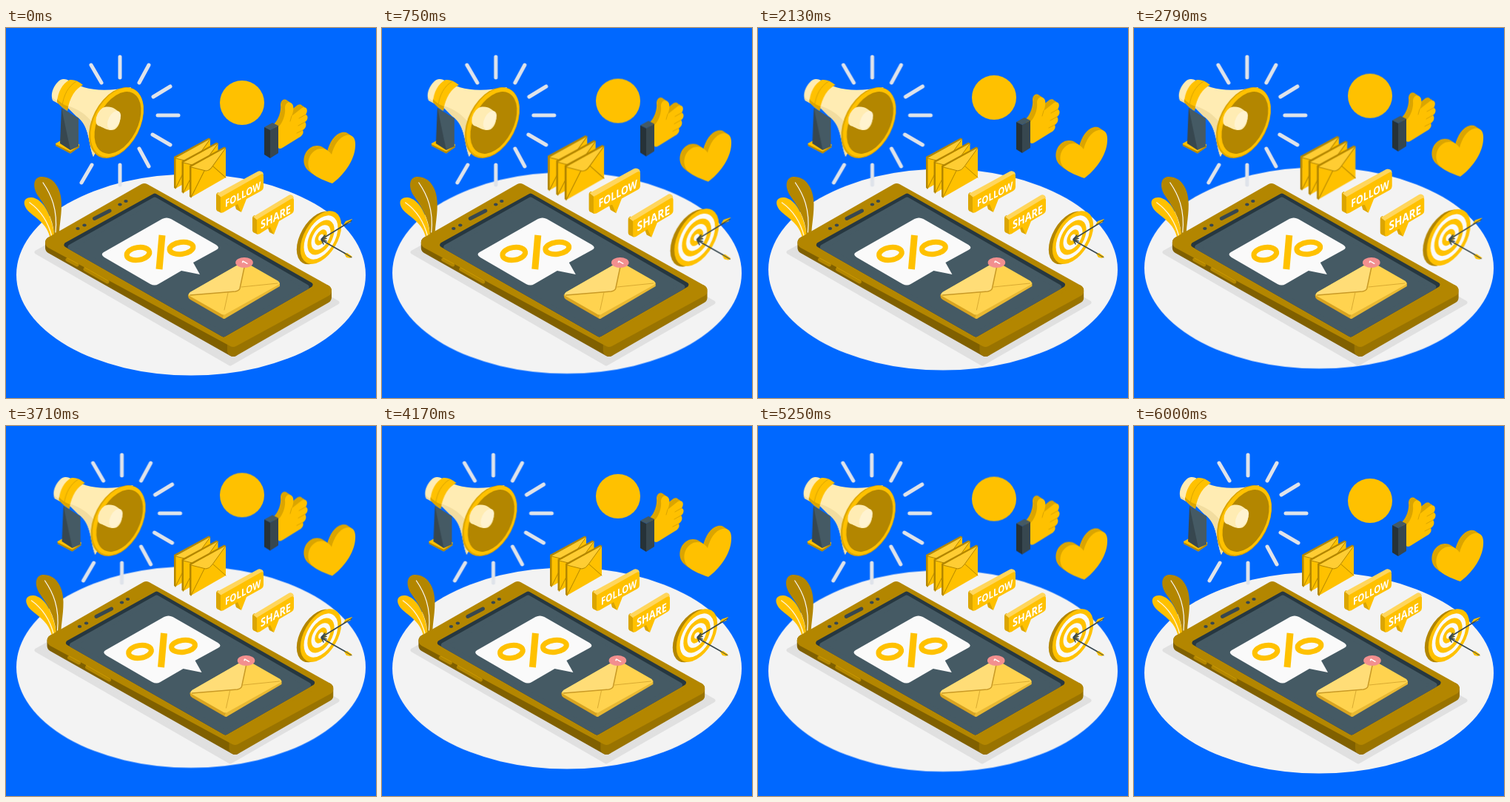
An HTML page for the animation above (6040 ms loop, 500 px wide and 500 px high).

```html
<!DOCTYPE html>
<html lang="en">
<head>
<meta charset="utf-8">
<title>Mobile marketing</title>
<style>
  html, body { margin: 0; width: 100%; height: 100%; overflow: hidden; background: #0068ff; }
  svg { display: block; width: 100vw; height: 100vh; }
  text { font-family: "Open Sans", "Noto Sans", sans-serif; font-weight: 700; fill: #fff; }

  .gold { fill: #ffc100; }
  .deep { fill: #dba500; }
  .dark { fill: #b38600; }
  .cream { fill: #ffecb3; }
  .slate { fill: #455a64; }
  .night { fill: #37474f; }
  .white { fill: #fafafa; }
  .line { fill: none; stroke-linecap: round; stroke-linejoin: round; }
  .round { stroke-linejoin: round; }

  /* A six second cycle, then a short rest on the first pose. */
  .float, .shake, .beat { animation: float 6.04s linear infinite; }
  .shake { animation-name: shake; }
  .beat { animation-name: beat; }
  .mails { transform-origin: 262.5px 189px; }
  .bubbles { transform-origin: 337px 236px; }
  .goal { transform-origin: 430.5px 283px; }

  @keyframes float {
    0%, 99.34%, 100% { transform: translateY(0); }
    49.67% { transform: translateY(-10px); }
  }
  @keyframes shake {
    0%, 99.34%, 100% { transform: translateX(0); }
    9.93%, 89.4% { transform: translateX(-1px); }
    19.87%, 79.47% { transform: translateX(2px); }
    29.8%, 49.67%, 69.54% { transform: translateX(-4px); }
    39.74%, 59.6% { transform: translateX(4px); }
  }
  @keyframes beat {
    0%, 29.8%, 39.74%, 59.6%, 100% { transform: scale(1); }
    9.93%, 49.67% { transform: scale(1.1); }
  }
</style>
</head>
<body>
<svg viewBox="0 0 500 500">
  <defs>
    <g id="mail">
      <path class="dark" d="M248 186L295 160.500L297 162L250 188V229L248 228Z"/>
      <path class="gold" d="M250 188L297 162V202L250 229Z"/>
      <path fill="#ffcd33" d="M250 188L297 162L279 187Q275 193 270 193Z"/>
      <path class="line" stroke="#b38600" stroke-width="1" d="M250 188L270 193Q275 193 279 187L297 162M250 229L268 193M297 202L280 187M250 188V229"/>
    </g>
    <path id="hand" d="M368 134C374 128 378 117 377 108C377 99 386 98 388 105C389 110 388 114 386 119L400 108C406 105 409 111 405 117C409 118 408 125 404 127C407 130 405 136 401 138C403 142 400 146 396 148L375 161C371 164 368 163 367 161Z"/>
    <path id="heart" d="M441 210C430 206 412 200 409 188C406 174 416 163 426 163C434 163 438 168 440 171C443 159 450 147 460 145C469 143 473 150 472 160C471 180 455 200 441 210Z"/>
  </defs>

  <rect width="500" height="500" fill="#0068ff"/>
  <ellipse class="float" cx="250" cy="333.500" rx="236" ry="136" fill="#f3f3f3"/>
  <path class="round" d="M41 303L187 222L448 371L303 454Z" fill="#e0e0e0" stroke="#e0e0e0" stroke-width="5"/>

  <g class="float">
    <circle class="gold" cx="319" cy="101" r="30"/>

    <g>
      <use href="#hand" class="deep" x="-6" y="-4"/>
      <use href="#hand" class="deep" x="-3" y="-2"/>
      <use href="#hand" class="gold"/>
      <path class="line" stroke="#dba500" d="M386 119L384 126M405 117L396 122M404 127L395 132M401 138L393 142"/>
      <path class="slate" d="M349 134L360 128L368 132L357 138Z"/>
      <path fill="#263238" d="M349 134L357 138V176L349 171Z"/>
      <path class="night" d="M357 138L368 132V169L357 176Z"/>
    </g>

    <g>
      <use href="#heart" class="deep" x="-6" y="-4"/>
      <use href="#heart" class="deep" x="-3" y="-2"/>
      <use href="#heart" class="gold"/>
    </g>
  </g>

  <g class="beat mails">
    <use href="#mail" x="-21" y="-12"/>
    <use href="#mail" x="-10.500" y="-6"/>
    <use href="#mail"/>
  </g>

  <g class="beat bubbles">
    <g>
      <path class="deep" d="M284 226Q284 223 287 222L291 229V250L287 248Q284 247 284 244Z"/>
      <path fill="#ffd65c" d="M285 224L340 194Q343 192 347 195L348 198L291 229Z"/>
      <path class="deep" d="M309 238L314 238L318 249L311 245Z"/>
      <path class="gold" d="M290 230Q290 228 293 227L344 198Q348 196 348 200V215Q348 218 345 220L325 231L318 249L313 238L294 249Q290 251 290 247Z"/>
      <text transform="matrix(.82 -.43 0 1 296 242.500)" font-size="14">FOLLOW</text>
    </g>
    <g>
      <path class="deep" d="M333 257Q333 254 336 253L340 260V279L336 277Q333 276 333 273Z"/>
      <path fill="#ffd65c" d="M334 255L382 226Q385 224 388 227L389 230L340 260Z"/>
      <path class="deep" d="M353 268L358 268L362 279L356 276Z"/>
      <path class="gold" d="M339 260Q339 258 342 257L385 231Q389 229 389 232V246Q389 249 386 251L369 261L362 279L357 269L343 278Q339 280 339 276Z"/>
      <text transform="matrix(.82 -.45 0 1 344 272)" font-size="15.500">SHARE</text>
    </g>
  </g>

  <g class="beat goal">
    <g transform="matrix(.866 -.5 0 1 420.500 283.500)"><circle class="dark" r="32"/></g>
    <g transform="matrix(.866 -.5 0 1 425.500 283)">
      <circle class="gold" r="32"/>
      <circle class="white" r="26.500"/>
      <circle class="gold" r="21"/>
      <circle class="white" r="15"/>
      <circle class="gold" r="9.500"/>
      <circle class="white" r="4"/>
    </g>
    <g class="line" stroke="#37474f" stroke-width="1.500">
      <path d="M427 285L466 261M427 287L466 309"/>
      <path d="M431 280L426 285.500L433 284.500M433 288L426 286L429 292"/>
    </g>
    <path class="gold" d="M456 266L459 261L468 258L465 263ZM457 305L461 304L468 309L465 311L460 310Z"/>
    <path class="line" stroke="#37474f" d="M457 266L467 260M457 304L467 310"/>
  </g>

  <g class="shake">
    <!-- leaves -->
    <path class="gold" d="M60 286C56 262 37 256 28 245C21 235 26 228 35 229C50 231 62 252 66 284Z"/>
    <path class="line" stroke="#fff3cc" stroke-width="1.500" d="M32 236C46 246 57 262 62 282"/>
    <path class="dark" d="M65 286C66 264 57 246 44 228C35 215 37 202 47 201C63 200 75 215 75 238C75 258 71 270 72 286Z"/>
    <path class="line" stroke="#fafafa" stroke-width="1.200" d="M50 209C61 225 70 245 67 276"/>

    <!-- phone body -->
    <g class="round" stroke-width="16">
      <path d="M61 290L307 423V436L61 297Z" fill="#806000" stroke="#806000"/>
      <path d="M307 423L432 355V364L307 436Z" fill="#997300" stroke="#997300"/>
      <path class="dark" d="M61 290L187 218L432 355L307 423Z" stroke="#b38600"/>
    </g>
    <g class="line" stroke="#b38600" stroke-width="5">
      <path d="M83 313L96 320M107 326L137 343"/>
    </g>
    <path class="line" stroke="#cc9a00" d="M83 311L97 318.500M106 323.500L138 341.500"/>
    <path class="line" stroke="#37474f" stroke-width="5" d="M119.500 257.500L140 247"/>
    <g class="night">
      <ellipse cx="97" cy="271" rx="2.700" ry="2"/>
      <ellipse cx="106" cy="266.500" rx="2.700" ry="2"/>
      <ellipse cx="154" cy="238.500" rx="2.700" ry="2"/>
      <ellipse cx="162" cy="234" rx="2.700" ry="2"/>
    </g>
    <g class="round" stroke-width="7">
      <path d="M82 293L201 227L411 347L294 414Z" fill="#263740" stroke="#263740"/>
      <path class="slate" d="M87 296L201 232L406 350L294 414Z" stroke="#455a64"/>
    </g>

    <!-- discount bubble -->
    <path class="white" d="M132 303L211 258Q217 255 223 258L284 293Q290 297 284 300L253 317L262 333L237 328L206 346Q201 349 195 346L133 310Q127 306 132 303Z"/>
    <g class="line" stroke="#ffc100">
      <ellipse cx="178.500" cy="305" rx="15.500" ry="8.500" stroke-width="7" transform="rotate(-9 178.500 305)"/>
      <ellipse cx="237" cy="297.500" rx="16" ry="8" stroke-width="7" transform="rotate(-7 237 297.500)"/>
      <path d="M211 280L207 326" stroke-width="9" stroke-linecap="butt"/>
    </g>

    <!-- message -->
    <path fill="#d9a420" d="M246 360L294 387V393L249 367Q246 365 246 362Z"/>
    <path fill="#e8b833" d="M294 387L370 344V349L297 392Q295 394 293 392Z"/>
    <path fill="#ffd34f" d="M249 357L317 318Q322 315 326 318L368 342Q371 345 368 347L298 386Q294 389 290 386L248 362Q245 360 249 357Z"/>
    <path class="line" stroke="#cfa02a" stroke-width=".8" d="M300 358L295 381M318 350L367 345"/>
    <path fill="#ffdd77" d="M249 357L317 318Q321 315 323 319L316 352Q315 355 310 356L249 361Q246 360 249 357Z"/>
    <path class="line" stroke="#c99a26" stroke-width="1.500" d="M249 361L310 356Q315 355 316 352L323 319"/>
    <ellipse cx="322" cy="317" rx="11.800" ry="7" fill="#f28f8f"/>
    <text transform="matrix(.866 -.5 .866 .5 322.500 317)" x="0" y="4" font-size="11" text-anchor="middle">1</text>

    <!-- megaphone -->
    <path class="gold" d="M67 156L76 151L99 157V161L87 169.500L67 159Z"/>
    <path class="dark" d="M67 157L87 167L99 159V161L87 169.500L67 159Z"/>
    <path class="night" d="M75 108L87 118V165L73 156Z"/>
    <path class="slate" d="M75 108L98 122V160L87 165Z"/>
    <path class="cream" d="M87 70C102 84 130 87 169 80L118 174C111 158 114 132 95 119L80 104Z"/>
    <path fill="#f2dda0" d="M80 104C94 108 112 116 123 138L118 174C111 158 114 132 95 119Z"/>
    <path class="cream" d="M85 71C80 68 74 68 70 73C63 80 60 91 63 97L76 105Z"/>
    <path fill="#f2dda0" d="M62 92C64 97 70 99 77 101L76 105L63 98Z"/>
    <path class="gold" d="M86 70Q95 69 104 77C94 82 86 93 83 112Q76 108 69 100C70 87 76 75 86 70Z"/>
    <path class="deep" d="M69 96Q75 103 84 106L83 112Q74 107 69 100Z"/>
    <path class="line" stroke="#dba500" d="M95 72C84 79 78 90 76 105"/>
    <ellipse class="deep" cx="149" cy="128" rx="32.300" ry="51.300" transform="rotate(27 149 128)"/>
    <ellipse class="gold" cx="150" cy="127.500" rx="31" ry="50" transform="rotate(27 150 127.500)"/>
    <ellipse class="dark" cx="151" cy="128" rx="26.900" ry="45" transform="rotate(27 151 128)"/>
    <path class="cream" d="M135 107C142 105 150 110 153 115C156 122 154 132 147 137C141 140 133 136 126 132Z"/>
    <ellipse cx="131" cy="119.500" rx="8" ry="14" transform="rotate(27 131 119.500)" class="cream"/>
    <ellipse cx="146" cy="124.500" rx="7.500" ry="13.500" transform="rotate(27 146 124.500)" fill="#fff3d0"/>

    <path class="line" stroke="#dfe3ea" stroke-width="5" d="M154 39V67M115 50L129 74M193 50L180 74M222 79L199 93M205 118H233M198 144L222 158M180 163L193 187M154 185V212M116 185L102 209"/>
  </g>
</svg>
</body>
</html>
```
